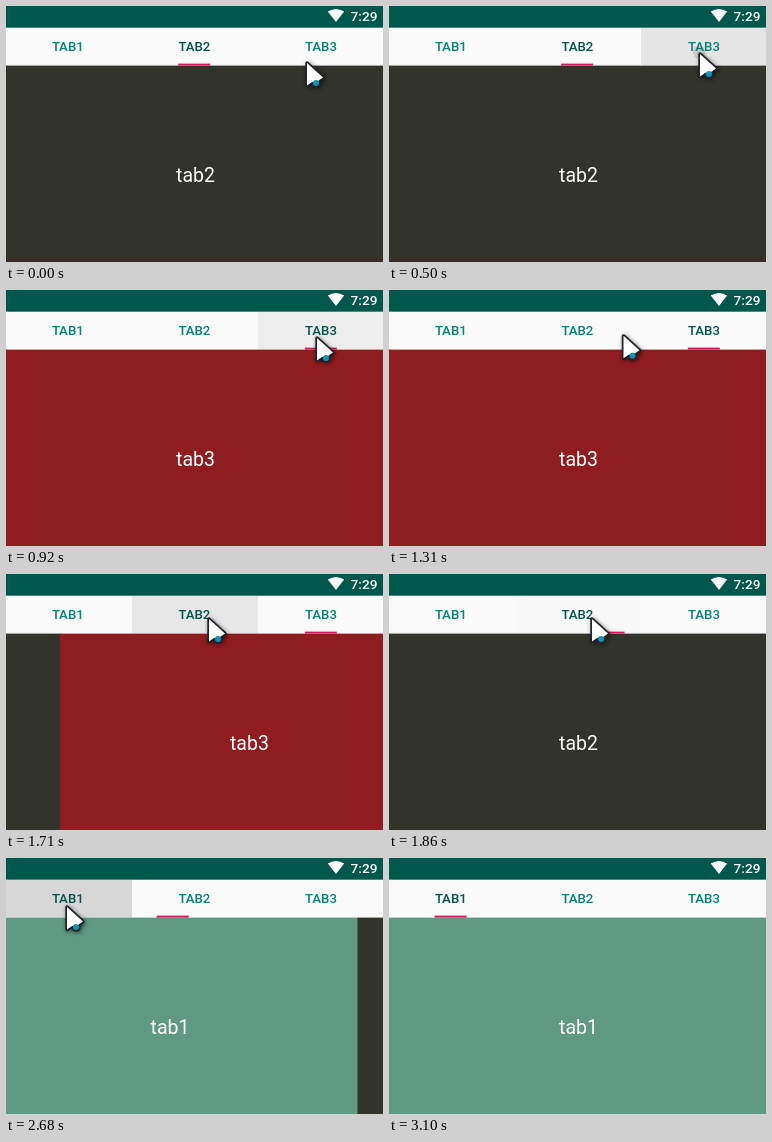
An HTML page with a canvas that plays this animation: 377x256 px, repeating every 3810 ms.

```html
<!DOCTYPE html>
<html lang="en">
<head>
<meta charset="utf-8">
<title>Tabs</title>
<style>
html, body { margin: 0; width: 377px; height: 256px; overflow: hidden; }
canvas { display: block; }
</style>
</head>
<body>
<canvas id="stage" width="377" height="256"></canvas>
<script>
const ctx = document.getElementById('stage').getContext('2d');
const W = 377, H = 256, LOOP = 3810;
const BAR = 21.7, PAGE = 59.6;
const PAGE_COLORS = ['#5f9984', '#32342c', '#8f1d20'];

// The picture refreshes every 140 ms, in bursts of activity.
const STEP = 140;
const BURSTS = [
  { start: 0, steps: 1 },
  { start: 480, steps: 6 },
  { start: 1710, steps: 4 },
  { start: 2680, steps: 3 },
];

const SWITCHES = [
  { press: 460, slide: 583.6, from: 1, to: 2 },
  { press: 1321, slide: 1705.2, from: 2, to: 1 },
  { press: 2429, slide: 2614.2, from: 1, to: 0 },
];

const POINTER_START = { x: 310, y: 77 };
const GLIDES = [
  { start: 0, end: 140, x: 320, y: 68 },
  { start: 910, end: 1330, x: 212, y: 65 },
  { start: 1940, end: 2220, x: 70, y: 69 },
  { start: 2820, end: 2960, x: 261, y: 242 },
];
const POINTER_GONE = 3100;

const clamp = v => Math.min(1, Math.max(0, v));
const mix = (a, b, k) => a + (b - a) * k;
const smooth = x => x * x * (3 - 2 * x);
const decelerate = x => 1 - (1 - x) ** 5;
const tabCenter = i => 61.8 + 126.6 * i;

// cubic-bezier(.4, 0, .2, 1)
function fastOutSlowIn(x) {
  let lo = 0, hi = 1;
  for (let i = 0; i < 20; i++) {
    const s = (lo + hi) / 2, r = 1 - s;
    if (1.2 * s * r * r + 0.6 * s * s * r + s ** 3 < x) lo = s; else hi = s;
  }
  return smooth(lo);
}

function refreshTime(clock) {
  const { start, steps } = BURSTS.findLast(burst => burst.start <= clock);
  return start + STEP * Math.min(steps, Math.floor((clock - start) / STEP));
}

function pointerAt(t) {
  return GLIDES.reduce((p, { start, end, x, y }) => {
    const k = smooth(clamp((t - start) / (end - start)));
    return { x: mix(p.x, x, k), y: mix(p.y, y, k) };
  }, POINTER_START);
}

function rect(x, y, w, h, color) {
  ctx.fillStyle = color;
  ctx.fillRect(x, y, w, h);
}

function circle(x, y, r, color) {
  ctx.fillStyle = color;
  ctx.beginPath();
  ctx.arc(x, y, r, 0, 7);
  ctx.fill();
}

function label(text, x, y, size, weight, color) {
  ctx.font = `${weight} ${size}px Roboto, sans-serif`;
  ctx.textAlign = 'center';
  ctx.fillStyle = color;
  ctx.fillText(text, x, y);
}

function drawStatusBar() {
  ctx.fillStyle = '#fff';
  ctx.fill(new Path2D('M321.8 5.6 Q330 0.6 338.2 5.6 L330 16Z'));
  label('7:29', 358, 14.7, 13.6, 500, '#fff');
}

function drawPages(position) {
  PAGE_COLORS.forEach((color, i) => {
    const x = (i - position) * W;
    rect(x, PAGE, W + 1, H - PAGE, color);
    label('tab' + (i + 1), x + 189.5, 175.8, 19.5, 400, '#fff');
  });
  if (position === 1) rect(0, 253, W, 3, '#3a2c2b');
}

// A press tints its tab while a darker circle grows from the pointer tip.
function drawRipple(t, pointer) {
  const touch = SWITCHES.findLast(s => s.press <= t);
  if (!touch) return;
  const age = t - touch.press;
  const fade = clamp(1 - (age - 160) / 380);
  ctx.save();
  ctx.beginPath();
  ctx.rect(126 * touch.to, BAR, 126, PAGE - BAR);
  ctx.clip();
  rect(0, BAR, W, PAGE - BAR, `rgba(0,0,0,${0.084 * fade})`);
  circle(pointer.x - 10, pointer.y - 22, age * 0.314, `rgba(0,0,0,${0.109 * fade})`);
  ctx.restore();
}

function drawTabs(selected, indicator) {
  for (let i = 0; i < 3; i++) {
    label('TAB' + (i + 1), tabCenter(i), 45.1, 13.2, 500, i === selected ? '#00574b' : '#008577');
  }
  rect(tabCenter(indicator) - 16.2, PAGE - 2, 32, 2, '#d81b60');
}

function drawPointer({ x, y }) {
  ctx.save();
  ctx.translate(x, y);
  ctx.lineJoin = 'round';
  ctx.lineWidth = 3.4;
  ctx.strokeStyle = '#20242a';
  ctx.shadowColor = 'rgba(0,0,0,.55)';
  ctx.shadowBlur = 4;
  ctx.shadowOffsetX = ctx.shadowOffsetY = 1;
  const arrow = new Path2D('M-9 -20 L7 -5.5 L2 -2 L-4 -1 L-9 2.5Z');
  ctx.stroke(arrow);
  circle(0, 0, 4.8, '#20242a');
  ctx.shadowColor = 'transparent';
  ctx.fillStyle = '#fff';
  ctx.fill(arrow);
  circle(0, 0, 3, '#1591b5');
  ctx.restore();
}

function draw(now) {
  const t = refreshTime(now % LOOP);
  const { slide, from, to } = SWITCHES.findLast(s => s.slide <= t) || { slide: 0, from: 1, to: 1 };
  const position = mix(from, to, decelerate(clamp((t - slide) / 158)));
  const indicator = mix(from, to, fastOutSlowIn(clamp((t - slide) / 300)));
  const pointer = pointerAt(t);

  rect(0, 0, W, H, '#00574b');
  rect(0, BAR, W, H - BAR, '#fafafa');
  drawStatusBar();
  drawRipple(t, pointer);
  drawPages(position);
  drawTabs(to, indicator);
  if (t < POINTER_GONE) drawPointer(pointer);
}

const begin = performance.now();
function loop() {
  draw(performance.now() - begin);
  requestAnimationFrame(loop);
}
loop();
</script>
</body>
</html>
```
